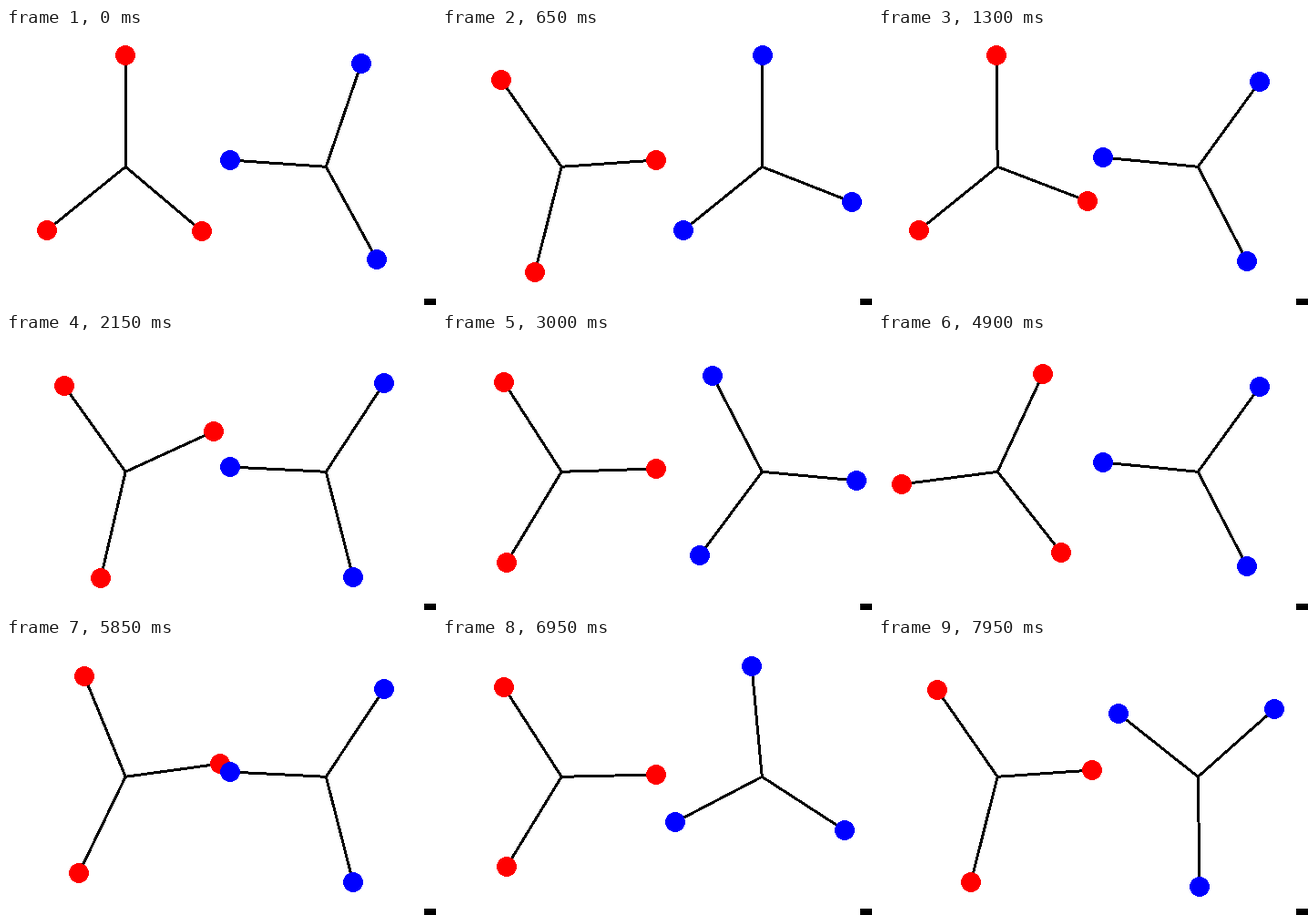
Animation of 472x304 px, one loop 8 s. Source, as an HTML page:

```html
<!DOCTYPE html>
<html lang="en">
<head>
<meta charset="utf-8">
<title>Two rotors</title>
<style>
  html, body { margin: 0; width: 100%; height: 100%; overflow: hidden; background: #fff; }
  svg { display: block; width: 472px; height: 304px; }
  line { stroke: #000; stroke-width: 3; }
</style>
</head>
<body>
<svg id="stage" viewBox="0 0 472 304" shape-rendering="crispEdges">
  <rect x="459" y="297" width="13" height="7"/>
</svg>
<script>
const LOOP = 8000, STEP = 50;
const ARM_GAP = 125.65;          // degrees between neighbouring arms
const RX = 104.8, RY = 121.5;    // path of the arm tips
const DISC = 10.9;

// Only one rotor turns at a time; each hands its motion to the other when arms meet.
// turns: [time in ms, degrees turned], linear in between.
const rotors = [
  { color: '#f00', hub: [131.2, 152.3], centre: [130.5, 151.5], start: 324, dir: 1,
    turns: [[0, 0], [200, 39], [855, 39], [1402, 146], [2049, 146], [2700, 271.6],
      [3297, 271.6], [3972, 403], [4612, 403], [5188, 511.3], [5875, 511.3],
      [6527, 631.1], [7109, 631.1], [7790, 758.8], [LOOP, 759]] },
  { color: '#00f', hub: [351.3, 152.3], centre: [351, 151.5], start: 176.8, dir: -1,
    turns: [[0, 0], [200, 0], [855, 127], [1402, 127], [2049, 250], [2700, 250],
      [3297, 363.9], [3972, 363.9], [4612, 487], [5188, 487], [5875, 615],
      [6527, 615], [7109, 721], [7790, 721], [LOOP, 760.5]] }
];

const stage = document.getElementById('stage');

function add(tag, attrs) {
  const el = document.createElementNS(stage.namespaceURI, tag);
  for (const name in attrs) el.setAttribute(name, attrs[name]);
  return stage.appendChild(el);
}

for (const r of rotors)
  r.lines = [0, 1, 2].map(() => add('line', { x1: r.hub[0], y1: r.hub[1] }));
for (const r of rotors)
  r.discs = [0, 1, 2].map(() => add('circle', { r: DISC, fill: r.color }));

function turned(turns, t) {
  const i = turns.findIndex(([time]) => time > t);
  const [t0, a0] = turns[i - 1], [t1, a1] = turns[i];
  return a0 + (a1 - a0) * (t - t0) / (t1 - t0);
}

function draw(now) {
  const t = Math.floor(now % LOOP / STEP) * STEP;
  for (const r of rotors) {
    const angle = r.start + r.dir * turned(r.turns, t);
    for (let i = 0; i < 3; i++) {
      const a = (angle + i * ARM_GAP) * Math.PI / 180;
      const x = Math.round(r.centre[0] + RX * Math.cos(a));
      const y = Math.round(r.centre[1] - RY * Math.sin(a));
      r.lines[i].setAttribute('x2', x);
      r.lines[i].setAttribute('y2', y);
      r.discs[i].setAttribute('cx', x);
      r.discs[i].setAttribute('cy', y);
    }
  }
}

const began = performance.now();
function frame() {
  draw(performance.now() - began);
  requestAnimationFrame(frame);
}
frame();
</script>
</body>
</html>
```
